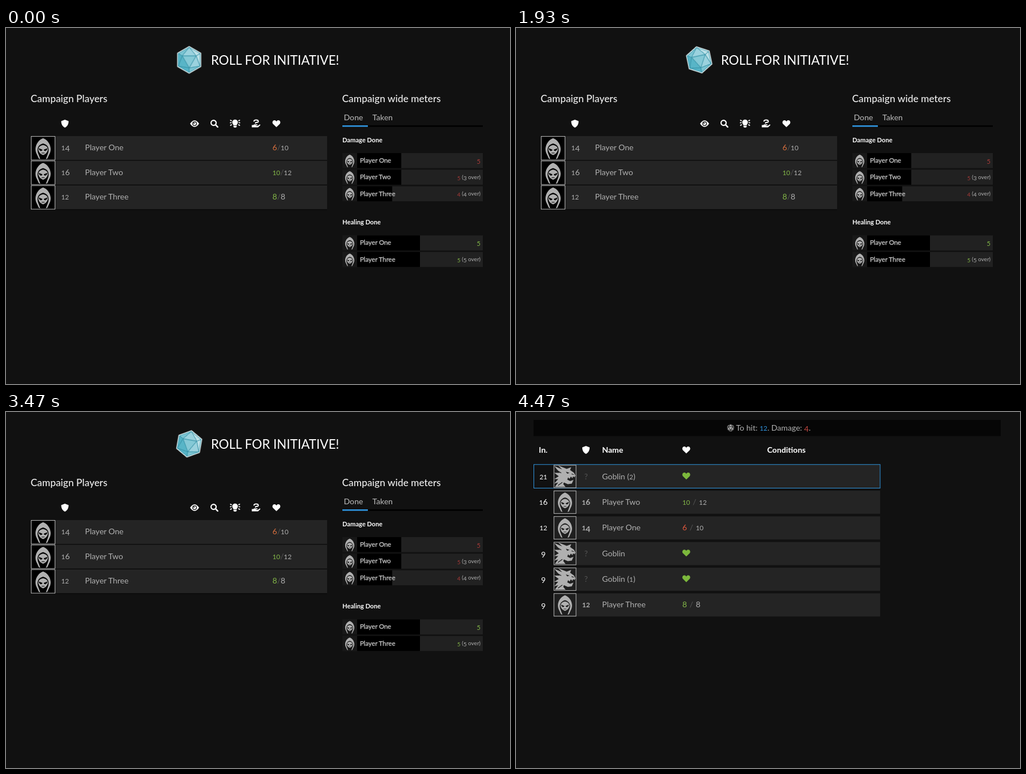
Write an HTML page that moves like this. It is 890x629 px and loops after 8 s.

```html
<!DOCTYPE html>
<html lang="en">
<head>
<meta charset="utf-8">
<title>Initiative tracker</title>
<style>
html, body { margin: 0; width: 100%; height: 100%; overflow: hidden; background: #111; }
svg { display: block; width: 890px; height: 629px; }
text { font-family: Lato, "Open Sans", sans-serif; white-space: pre; }
</style>
</head>
<body>
<svg id="stage" viewBox="0 0 890 629"></svg>
<script>
const LOOP = 8000, SWITCH = 3700;
const COUNT_START = 3636, COUNT_TIME = 750;
const GREY = '#b0b0b0', DIM = '#555', WHITE = '#fff', ROW = '#242424';
const GREEN = '#84b848', ORANGE = '#d9703f', RED = '#a83a38', BLUE = '#3096e0';

// Text with old-style figures: 0-2 sit at x-height, 3 4 5 7 9 hang below the line.
function spans(parts, size) {
  let shift = 0;
  return parts.map(([str, fill]) =>
    str.match(/[0-2]+|[34579]+|[^0-579]+/g).map(run => {
      const drop = /[34579]/.test(run) ? size * 0.17 : 0;
      const fs = /[0-2]/.test(run) ? size * 0.84 : size;
      const out = `<tspan fill="${fill}" font-size="${fs}" dy="${drop - shift}">${run}</tspan>`;
      shift = drop;
      return out;
    }).join('')).join('');
}

function text(x, y, size, parts, { weight = 400, anchor = 'start', attr = '' } = {}) {
  return `<text x="${x}" y="${y}" font-size="${size}" font-weight="${weight}" text-anchor="${anchor}" ${attr}>${spans(parts, size)}</text>`;
}

const rect = (x, y, w, h, fill, attr = '') =>
  `<rect x="${x}" y="${y}" width="${w}" height="${h}" fill="${fill}" ${attr}/>`;
const path = (d, fill, attr = '') => `<path d="${d}" fill="${fill}" ${attr}/>`;
const line = (d, color, w) =>
  path(d, 'none', `stroke="${color}" stroke-width="${w}" stroke-linecap="round" stroke-linejoin="round"`);
const at = (x, y, body, scale = 1) => `<g transform="translate(${x} ${y}) scale(${scale})">${body}</g>`;

const shield = path('M0-7L6.5-4.6C6.6 1 4 5 0 7C-4 5-6.6 1-6.5-4.6Z', WHITE);
const heart = fill =>
  path('M0 6.3L-6 .4C-8.6-2.8-5.4-7.4-1.6-5.4L0-4L1.6-5.4C5.4-7.4 8.6-2.8 6 .4Z', fill);
const eye = path('M-8 0Q0-11.5 8 0Q0 11.5-8 0Z', WHITE) +
  '<circle r="4" fill="#111"/><circle r="2.7" fill="#fff"/><circle cx="-1" cy="-1" r="1.1" fill="#111"/>';
const lens = '<circle cx="-1.4" cy="-1.4" r="4.5" fill="none" stroke="#fff" stroke-width="2.2"/>' +
  line('M2.4 2.4L5.8 5.8', WHITE, 2.6);
const bulb = path('M-5-2.2A5 5 0 0 1 5-2.2Q4.8 0 2.8 2.4V6Q0 8-2.8 6V2.4Q-4.8 0-5-2.2Z', WHITE) +
  line('M-8-6L-6.6-5.2M8-6L6.6-5.2M-8.2-1.6H-7M8.2-1.6H7M-8 3L-6.4 2M8 3L6.4 2', WHITE, 1.9) +
  line('M-2.6 3.4H2.6', '#111', 0.8);
const hand = path('M-7.5 2.4H-5L-3 1.2H2.2Q3.4 2.2 2 3.2H-.6V4H3L6.4 1.4Q8 1.2 7.6 2.8L3.6 6.6H-7.5Z', WHITE) +
  line('M-3.6-4.4Q-3-6.4 0-6.4Q4-6.4 4-4Q4-1.8 0-2.2L-1-1', WHITE, 2);

// Portraits live in a 40 x 40 box.
const hood = bg =>
  path('M20 3.5C13 6 8 13 7.5 21C7.5 25 8.5 28 10 30.5L13 37L15.5 38L12.5 30C9 22 11 14.5 20 12.2C29 14.5 31 22 27.5 30L24.5 38L27 37L30 30.5C31.5 28 32.5 25 32.5 21C32 13 27 6 20 3.5Z', GREY) +
  path('M20 14.6C14.6 15.6 12 18.6 12.2 22.6C12.8 26.6 16 30 20 31.2C24 30 27.2 26.6 27.8 22.6C28 18.6 25.4 15.6 20 14.6Z', GREY) +
  path('M13 20L19 22.4Q18.6 24.8 16 24.4Q13.4 23.4 13 20ZM27 20L21 22.4Q21.4 24.8 24 24.4Q26.6 23.4 27 20Z', bg) +
  line('M18 27.8H22', bg, 0.9);
const dragon = bg =>
  path('M1 2L15 8L8 1L23 7L31 4L29 9L36 14L38.5 19L36.5 22L34.5 20L33 23.5L30.5 20.5L28 24.5L25.5 22L24 26L29 28.5L35 26.5L32 33L25 34L18 31L17 34L21 39H2L8 31L1 33L8 25L1 25L9 20L1 14L11 14Z', GREY) +
  path('M21.5 12L28 14L24 15.6Z', bg) +
  line('M15 31L8 36M3 8L13 14M32 16L35 17', bg, 1.2);

function portrait(x, y, w, h, art, bg, border = true) {
  const frame = rect(x + .5, y + .5, w - 1, h - 1, bg, border ? 'stroke="#bbb"' : '');
  return frame + at(x, y, art(bg), w / 40);
}

// Twenty-sided die, point up, with its front triangle pointing down.
const polar = (r, deg) => [r * Math.cos(deg * Math.PI / 180), r * Math.sin(deg * Math.PI / 180)];
const poly = (pts, attr) => `<polygon points="${pts.map(p => p.map(v => v.toFixed(2)).join()).join(' ')}" ${attr}/>`;

function dieFaces(R, paint) {
  const hex = k => polar(R, 60 * k - 90);
  const tri = k => polar(R * 0.64, 60 * k - 90);
  const faces = [[tri(1), tri(3), tri(5)]];
  for (const k of [1, 3, 5]) {
    faces.push([tri(k), tri(k + 2), hex(k + 1)], [tri(k), hex(k), hex(k + 1)], [tri(k), hex(k), hex(k - 1)]);
  }
  return faces.map(f => poly(f, paint(f))).join('');
}

function shade(face) {
  const x = face.reduce((s, p) => s + p[0], 0) / 3, y = face.reduce((s, p) => s + p[1], 0) / 3;
  const light = 68 + 17 * (x * 0.87 - y * 0.5) / 18;
  return `fill="hsl(190 50% ${light.toFixed(1)}%)" stroke="#3994a8" stroke-width="1" stroke-linejoin="round"`;
}

const outline = R => [0, 1, 2, 3, 4, 5].map(k => polar(R, 60 * k - 90));
const bigDie = poly(outline(23.6), 'fill="#fff" stroke="#e8f6f8" stroke-width="1.6" stroke-linejoin="round"') +
  dieFaces(22.3, shade);
const smallDie = dieFaces(7, () => `fill="${GREY}" stroke="#111" stroke-width=".7"`);

function meter(y, name, fill, value, color, over) {
  const parts = [[value, color]];
  return rect(594, y, 248, 26.6, '#212121') + rect(594, y, 26, 26.6, '#181818') +
    rect(620, y, fill, 26.6, '#000') + portrait(594, y + .5, 26, 26, hood, '#181818', false) +
    text(625, y + 17, 11.4, [[name, '#c4c4c4']], { weight: 500, attr: 'stroke="#c4c4c4" stroke-width=".25"' }) +
    (over
      ? text(838, y + 16.6, 10, [...parts, [` (${over} over)`, GREY]], { anchor: 'end' })
      : text(838, y + 16.6, 11.5, parts, { anchor: 'end' }));
}

function campaignPage() {
  const heads = [[104, shield], [333, eye], [368, lens], [404.5, bulb], [441.5, hand], [477.5, heart(WHITE)]];
  const players = [['14', 'Player One', '6', ORANGE, '10'], ['16', 'Player Two', '10', GREEN, '12'],
    ['12', 'Player Three', '8', GREEN, '8']];
  const bold = { weight: 700 }, medium = { weight: 500 };
  return at(323.5, 56.3, `<g id="die">${bigDie}</g>`) +
    text(362, 65, 22.4, [['ROLL FOR INITIATIVE!', WHITE]]) +
    text(43.5, 131, 17.4, [['Campaign Players', '#eee']], medium) +
    text(593.5, 131, 17.4, [['Campaign wide meters', '#eee']], medium) +
    heads.map(([x, icon]) => at(x, 169, icon)).join('') +
    players.map(([ac, name, hp, color, max], i) => {
      const y = 191 + 43.5 * i;
      return rect(44, y, 523, 42.4, ROW) + rect(44, y + 42.4, 523, 1, '#050505') +
        portrait(44, y, 43, 42.6, hood, '#000') +
        text(97.5, y + 25, 14.1, [[ac, GREY]]) + text(139.5, y + 25, 14.1, [[name, GREY]]) +
        text(470.5, y + 25, 14.1, [[hp, color], ['/', DIM], [max, GREY]]);
    }).join('') +
    text(596.5, 163, 14.1, [['Done', GREY]], medium) + text(647, 163, 14.1, [['Taken', GREY]], medium) +
    rect(594, 172, 248, 2.6, '#000') + rect(594, 172, 45, 2.6, BLUE) +
    text(594, 202, 11.2, [['Damage Done', WHITE]], bold) +
    meter(221, 'Player One', 78, '5', RED) +
    meter(250.3, 'Player Two', 78, '5', RED, '3') +
    meter(279.6, 'Player Three', 62, '4', RED, '4') +
    text(594, 347, 11.2, [['Healing Done', WHITE]], bold) +
    meter(366.4, 'Player One', 111, '5', GREEN) +
    meter(395.7, 'Player Three', 111, '5', GREEN, '5');
}

const fighters = [
  { turn: '21', name: 'Goblin (2)' },
  { turn: '16', name: 'Player Two', ac: '16', hp: 10, max: 12, color: GREEN },
  { turn: '12', name: 'Player One', ac: '14', hp: 6, max: 10, color: '#e0583e' },
  { turn: '9', name: 'Goblin' },
  { turn: '9', name: 'Goblin (1)' },
  { turn: '9', name: 'Player Three', ac: '12', hp: 8, max: 8, color: GREEN }
];

function battlePage() {
  const mid = { anchor: 'middle' }, midBold = { anchor: 'middle', weight: 700 };
  return rect(31, 14, 825, 28.5, '#060606') + at(379, 28, smallDie) +
    text(388.5, 33, 14.1, [['To hit: ', GREY], ['12', BLUE], ['. Damage: ', GREY], ['4', '#c0463f'], ['.', GREY]]) +
    text(48, 72, 14.1, [['In.', WHITE]], midBold) + at(123.5, 67, shield) +
    text(152, 72, 14.1, [['Name', WHITE]], { weight: 700 }) +
    fighters.map((f, i) => {
      const y = 93 + 45.35 * i;
      const box = i
        ? rect(66.5, y + .7, 576.5, 40.8, ROW)
        : rect(66.5, 93, 576, 41, ROW) + rect(31.5, 92.8, 611.5, 41.7, 'none', `stroke="${BLUE}"`);
      return box + portrait(66.5, y + .5, 40, 41, f.ac ? hood : dragon, '#1f1f1f') +
        text(48.3, y + 25.5, 14.1, [[f.turn, WHITE]], mid) +
        text(123.7, y + 25.5, 14.1, [[f.ac || '?', f.ac ? GREY : DIM]], f.ac ? midBold : mid) +
        text(152, y + 25.5, 14.1, [[f.name, GREY]]);
    }).join('') +
    '<g id="health">' + at(306, 67, heart(WHITE)) +
    fighters.map((f, i) => {
      const y = 93 + 45.35 * i;
      return f.hp
        ? `<text class="hp" x="299" y="${y + 25.5}" font-size="14.1" word-spacing="1"></text>`
        : at(306, y + 20, heart('#7cb83c'));
    }).join('') + '</g>' +
    `<g id="conditions">${text(470.5, 72, 14.1, [['Conditions', WHITE]], midBold)}</g>`;
}

const $ = id => document.getElementById(id);
$('stage').innerHTML = rect(0, 0, 890, 629, '#111') +
  `<g id="campaign">${campaignPage()}</g><g id="battle">${battlePage()}</g>`;

// The die turns once on hover, turns back on leave, and turns again before the click.
const turns = [[0, 0], [345, 0, 'ease'], [1045, 360], [1896, 360, 'ease'], [2596, 0],
  [3440, 0, 'ease'], [4140, 360], [LOOP, 360]];
const spin = $('die').animate(
  turns.map(([ms, deg, easing = 'linear']) => ({ offset: ms / LOOP, transform: `rotate(${deg}deg)`, easing })),
  { duration: LOOP, iterations: Infinity });
spin.pause();

const heroes = fighters.filter(f => f.hp);
const counters = [...document.querySelectorAll('.hp')];

// One clock drives the die, the page change and the counters.
function draw() {
  const t = performance.now() % LOOP;
  spin.currentTime = t;
  const fighting = t >= SWITCH;
  $('campaign').setAttribute('visibility', fighting ? 'hidden' : 'visible');
  $('battle').setAttribute('visibility', fighting ? 'visible' : 'hidden');

  const left = 1 - Math.min(1, Math.max(0, (t - COUNT_START) / COUNT_TIME));
  const progress = 1 - left * left;
  heroes.forEach((h, i) => {
    const hp = String(Math.floor(h.hp * progress));
    counters[i].innerHTML = spans([[hp, h.color], [' / ', DIM], [String(h.max), GREY]], 14.1);
  });
  // The health column widens once a count reaches two digits.
  const wide = progress === 1;
  $('health').setAttribute('transform', `translate(${wide ? -5.3 : 0} 0)`);
  $('conditions').setAttribute('transform', `translate(${wide ? 7 : 0} 0)`);
  requestAnimationFrame(draw);
}
draw();
</script>
</body>
</html>
```
